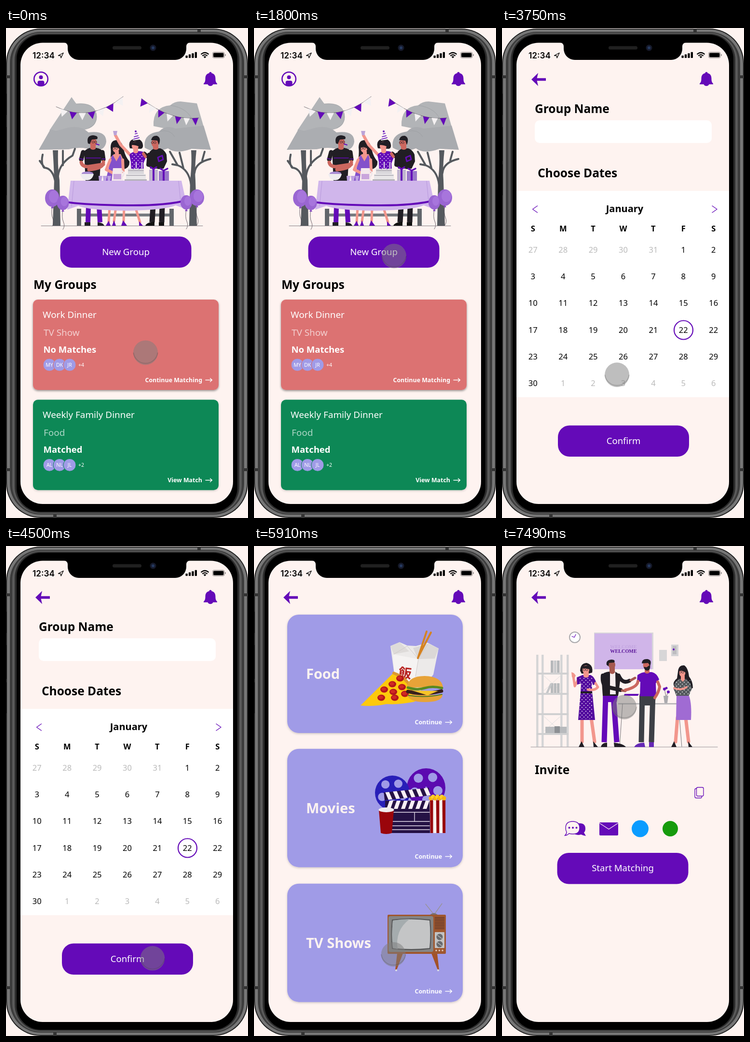
Write an HTML page that moves like this. It is 502 px wide and 1014 px high and loops after 8000 ms.

```html
<!DOCTYPE html>
<html lang="en">
<head>
<meta charset="utf-8">
<title>Group planner prototype</title>
<style>
html, body { margin: 0; width: 100%; height: 100%; overflow: hidden; background: #fdf3f0; }
svg { display: block; width: 100%; height: 100%; }
text { font-family: "Noto Sans", "Open Sans", sans-serif; white-space: pre; }
.clock { font-family: Inter, "Liberation Sans", sans-serif; }
.cjk { font-family: "Noto Sans CJK JP", "Noto Sans CJK SC", "Noto Sans CJK", sans-serif; }
.slab { font-family: "Liberation Serif", "Noto Serif", serif; }
</style>
</head>
<body>
<svg id="stage" viewBox="0 0 502 1014"></svg>
<script>
const LOOP = 8000, PURPLE = '#640ab8', BG = '#fef3f0', LAV = '#a09be7', INK = '#211e24', PINK = '#f2968c', TAN = '#cc675f', BROWN = '#a5584f';

// Drawing helpers, each returns SVG markup
const R = (x, y, w, h, fill, r = 0, more = '') => `<rect x="${x}" y="${y}" width="${w}" height="${h}" rx="${r}" fill="${fill}" ${more}/>`;
const C = (x, y, r, fill, more = '') => `<circle cx="${x}" cy="${y}" r="${r}" fill="${fill}" ${more}/>`;
const E = (x, y, rx, ry, fill, more = '') => `<ellipse cx="${x}" cy="${y}" rx="${rx}" ry="${ry}" fill="${fill}" ${more}/>`;
const P = (d, fill, more = '') => `<path d="${d}" fill="${fill}" ${more}/>`;
const L = (d, color, w = 1, cap = 'round') => `<path d="${d}" fill="none" stroke="${color}" stroke-width="${w}" stroke-linecap="${cap}" stroke-linejoin="round"/>`;
const T = (x, y, s, size, fill = '#000', weight = 400, anchor = 'start', more = '') =>
  `<text x="${x}" y="${y}" font-size="${size}" fill="${fill}" font-weight="${weight}" text-anchor="${anchor}" ${more}>${s}</text>`;
const G = (body, more = '') => `<g ${more}>${body}</g>`;
const each = (list, fn) => list.map(fn).join('');
const range = (n, fn) => each([...Array(n).keys()], fn);

const heading = (x, y, s) => T(x, y, s, 24.5, '#000', 700);
const action = (x, y, s) => T(x, y, s, 12.4, '#fff', 600, 'end') + L(`M${x + 7} ${y - 4.5}h13.5m-4-3.5l4 3.5l-4 3.5`, '#fff', 1.4);
const button = (x, y, s) => R(x, y, 272, 64.5, PURPLE, 24) + T(x + 136, y + 38, s, 18.6, '#fff', 400, 'middle');

const status = () =>
  T(55, 63, '12:34', 17.2, '#000', 600, 'start', 'class="clock"') +
  P('M108.5 57L119 51.5L114 62L113.3 57.4Z', 'none', 'stroke="#000" stroke-width="1.3" stroke-linejoin="round"') +
  range(4, i => R(372.5 + i * 6.4, 57 - i * 2.4, 4.3, 5 + i * 2.4, '#000', 1)) +
  L('M404.5 54.5Q412.5 47.5 420.5 54.5', '#000', 2.3, 'butt') +
  L('M407.3 57.7Q412.5 53.2 417.7 57.7', '#000', 2.2, 'butt') +
  P('M412.5 62.5L409.6 59.6Q412.5 57 415.4 59.6Z', '#000') +
  R(428.5, 50, 24.5, 12, 'none', 3, 'stroke="#8a8583"') + R(430, 51.5, 21.5, 9, '#000', 1.8) + R(454.3, 54, 1.6, 4, '#8a8583', 1);

const bell = P('M424 91c2 0 2.5 1 2.5 2.5c6 1 8 6 8 11c0 6 1 8 3.5 10.5v1.5h-28v-1.5c2.5-2.5 3.5-4.5 3.5-10.5c0-5 2-10 8-11c0-1.5 .5-2.5 2.5-2.5zM418.5 116h11a5.5 4 0 0 1-11 0z', PURPLE);
const back = P('M61 106.5L75 93L72.5 103.7H91V109.3H72.5L75 120Z', PURPLE);
const page = (id, body) => G(R(30, 30, 441, 955, BG) + status() + bell + body, `id="${id}"`);
const dots = (x, y, w, h) => R(x, y, w, h, 'url(#dots)');
const glasses = (x, y) => C(x - 2.5, y, 2.2, 'none', 'stroke="#33262d" stroke-width=".8"') + C(x + 3, y, 2.2, 'none', 'stroke="#33262d" stroke-width=".8"');

// Home: garden party
function bunting(x0, y0, cx, cy, x1, y1, first, step, odd) {
  const at = t => [x0, y0].map((a, k) => (1 - t) ** 2 * a + 2 * t * (1 - t) * [cx, cy][k] + t * t * [x1, y1][k]);
  return L(`M${x0} ${y0}Q${cx} ${cy} ${x1} ${y1}`, '#55505a', .8) + range(7, i => {
    const t = first + i * step, a = at(t - .055), b = at(t + .055);
    const dx = b[0] - a[0], dy = b[1] - a[1], n = 15 / Math.hypot(dx, dy);
    const tip = [(a[0] + b[0]) / 2 - dy * n, (a[1] + b[1]) / 2 + dx * n];
    return P(`M${a}L${b}L${tip}Z`, i % 2 === odd ? PURPLE : '#f4f1f2');
  });
}
const balloon = (x, y, rx, ry) => L(`M${x} ${y + ry}q-3 15 1 24t-1 16`, '#4a4550', .8) + E(x, y, rx, ry, '#9a66d2') + E(x + 3, y - 3, rx - 5, ry - 5, '#a775dc') + P(`M${x - 3} ${y + ry + 3}l3-5l3 5z`, '#8447c0');

function party() {
  const trees =
    P('M136 143L146 157Q187 153 188 184Q188 207 160 211L90 212Z', '#b2b4b7') +
    L('M146 157Q187 153 188 184Q188 200 172 207', '#9b9da1', .8) +
    P('M68 252L92 210Q104 214 119 209Q152 198 171 216Q208 211 208 235Q206 254 182 254Q158 244 130 251Z', '#abadb1') +
    P('M306 203Q304 163 341 160Q349 152 362 152L396 156L410 204L360 214Z', '#b2b4b7') +
    P('M288 248Q283 219 318 214Q330 200 352 208L410 202L425 252L385 250Q352 262 336 249Q308 260 288 248Z', '#a9abaf') +
    L('M341 160Q380 166 388 195M318 214Q340 208 350 225', '#9b9da1', .8) +
    P('M97 409L100 315Q99 280 97 253H108Q107 290 111 315L113 409Z', '#55595e') +
    L('M103 322Q98 290 79 289Q72 280 76 262M80 289L70 275M108 306Q111 280 138 264L143 250M118 284L118 254', '#55595e', 4) +
    P('M380 409L382 315Q386 280 384 253H395Q391 290 393 315L396 409Z', '#55595e') +
    L('M384 325Q380 293 356 284L340 256M356 284L345 282M391 300Q393 278 424 271M407 274L412 256M368 290L360 258', '#55595e', 4);

  const under =
    R(150, 384, 195, 6, '#777b80') + R(147, 374, 9, 35, '#62666b') + R(339, 374, 9, 35, '#62666b') +
    L('M171 368L170 402M193 368L195 402', PURPLE, 10, 'butt') + P('M163 402h12v7h-12zM190 402q12 1 14 7h-14z', INK) +
    L('M215 370L213 402M228 370L224 400M245 370L244 400M268 370L278 402', PINK, 5) +
    P('M207 409l6-10l4 10zM220 409l4-11l4 11zM239 409l4-11l8 11zM276 400l8 9h-8z', PURPLE) +
    L('M305 368L303 402M324 368L323 402', INK, 11, 'butt') + P('M289 409q3-7 19-8v8zM317 402h11v7h-11z', '#111');

  const man =
    P('M162 255Q170 248 176 248H187Q198 250 201 256L196 282L194 316H165Z', INK) + L('M160 257L156 272M200 257L202 272', INK, 9) +
    L('M156 278Q158 287 170 287L202 282M202 277Q203 291 172 293', TAN, 7) + L('M152 270l9 2M166 269H196M199 271h7', PURPLE, 1.5) +
    P('M175 250v-8h11v8q-5 4-11 0z', TAN) + E(181, 237, 7.5, 9, TAN) + P('M170 239Q166 223 180 222Q193 223 189 230L178 231L174 240Z', INK) +
    glasses(183, 236) + L('M187 240l6 2', PURPLE, 2);

  const brunette =
    P('M217 247Q217 232 230 232Q241 234 244 250Q247 266 256 276Q257 290 244 292L214 280Q219 264 217 247Z', INK) +
    P('M216 268L224 261H238L242 270L240 316H210Z', PINK) + P('M217 272L221 262L229 276L237 262L241 274L240 316H207Z', '#8351cb') +
    P('M226 263v-8h8v8l-4 5z', PINK) + E(228, 249, 7, 9, PINK) + P('M220 248Q221 236 231 237Q238 243 237 254Q233 243 220 248Z', INK) + glasses(226, 249) +
    L('M216 273L208 293L222 300M242 273L243 296L233 302', PINK, 6);

  const dancer =
    L('M259 264L238 242L227 222', PINK, 6) + P('M222 213h9l-2 9h-5z', '#bba3d8') +
    P('M256 262Q266 252 284 256L291 266L285 280L286 300H260L259 277Z', PURPLE) + dots(259, 259, 26, 40) +
    P('M257 249Q252 234 264 230Q282 227 284 242Q285 249 279 250Z', INK) + P('M264 257v-8h10v8q-5 5-10 0z', PINK) + E(268, 244, 7, 9, PINK) + P('M260 242Q264 232 276 237L277 246Q270 242 260 242Z', INK) +
    P('M269 214L263 233L277 231Z', '#f4f1f2') + L('M266 225l8-2M265 230l11-3M268 219l4-1', PURPLE, 1.8) + C(269, 214, 2, PURPLE);

  const guest =
    P('M298 256Q304 250 309 249H320Q329 252 333 262L334 276L327 291H299L295 272Z', INK) + L('M297 262L295 283L318 288M294 266L287 260', INK, 8) +
    L('M285 260l4 6', TAN, 6) + L('M315 268l9-4l2 8l-9 4z', PURPLE, 3) +
    P('M305 250v-8h11v8q-5 4-11 0z', TAN) + E(309, 238, 7.5, 9, TAN) + P('M301 232Q303 222 313 223Q323 227 317 242L314 233Z', INK) + glasses(306, 237);

  const table =
    P('M134 316H364L377 376L352 367Q330 377 248 378Q170 377 150 368L127 376Z', '#d0b6eb') +
    L('M141 317L136 369M358 317L363 367', '#b899dc', 1) + L('M131 361Q170 366 250 367T373 357', PURPLE, 4) +
    E(169, 301, 12, 4, '#a88bd3') + P('M154 302h28q-3 13-14 13t-14-13z', '#eeecef') + range(3, i => P(`M${192 + i * 9} 306h8l-2 10h-5z`, '#bda2e2')) +
    P('M222 290h18l3 26h-24z', '#f4e8ec') + L('M240 295q9 6 0 14', '#eee5ea', 2.5) + R(223, 302, 16, 11, '#c9a5dc') +
    R(253, 291, 33, 11, '#dad8dc') + R(249, 302, 41, 11, '#e9e7e9') + R(246, 313, 46, 3, '#b5b3b8') + L('M250 305h39M254 295h31', '#aaa7ae', 1.5) +
    range(5, i => R(257 + i * 6, 277 + i % 2 * 2, 2, 13, i % 2 ? PURPLE : '#eee')) +
    R(297, 293, 18, 23, '#c0b5cf') + R(317, 296, 21, 20, '#9976c9') + R(304, 293, 4, 23, PURPLE) + R(325, 296, 4, 20, PURPLE) +
    L('M306 292l-6-4m6 4l6-4M327 295l-7-4m7 4l8-4', PURPLE, 3.5);

  return trees + bunting(104, 163, 173, 197, 243, 142, .12, .136, 1) + bunting(281, 146, 340, 193, 400, 186, .055, .147, 0) +
    under + man + brunette + dancer + guest + table + balloon(96, 352, 15, 18) + balloon(118, 362, 12.5, 15) + balloon(396, 351, 15, 17) + balloon(374, 361, 12, 15) + L('M73 409.5H408', '#77727a', .9);
}

const groupCard = (y, fill, shadow, title, kind, state, people, extra, link) =>
  R(56, y, 385, 187, fill, 10, `filter="url(#${shadow})"`) + T(76, y + 38, title, 18.9, '#fff') +
  T(78, y + 74.5, kind, 18.9, '#fff', 400, 'start', 'opacity=".66"') + T(77.5, y + 109.5, state, 18.5, '#fff', 700) +
  each(people, (p, i) => C(90 + i * 21, y + 135, 13, LAV, `stroke="${fill}"`) + T(90 + i * 21, y + 138.8, p, 10.5, '#fff', 400, 'middle')) +
  T(150, y + 139, extra, 10.5, '#fff') + action(407, y + 171, link);

const home = page('home',
  C(72.5, 105.5, 14.3, 'none', `stroke="${PURPLE}" stroke-width="2.6"`) + C(72.5, 102, 4, PURPLE) + P('M65.5 118v-5q0-4 4-4h6q4 0 4 4v5q-7 4-14 0z', PURPLE) +
  party() + button(112.5, 431.5, 'New Group') + heading(57, 540, 'My Groups') +
  groupCard(562, '#dc7272', 'lifted', 'Work Dinner', 'TV Show', 'No Matches', ['MY', 'DK', 'JR'], '+4', 'Continue Matching') +
  groupCard(769.3, '#0c8857', 'shadow', 'Weekly Family Dinner', 'Food', 'Matched', ['AL', 'NL', 'JL'], '+2', 'View Match'));

// Calendar
const dayNumber = i => i < 5 ? 27 + i : i < 27 ? i - 4 : i < 36 ? i - 5 : i - 35;
const colX = i => 64.3 + i % 7 * 62.4;
const dates = page('dates',
  back + heading(68, 176, 'Group Name') + R(68, 191, 367, 47, '#fff', 10) + heading(74, 309, 'Choose Dates') +
  R(30, 337, 441, 427, '#fff') + T(254.5, 381, 'January', 20, '#000', 700, 'middle') +
  L('M73.5 368L63.5 375L73.5 382M436 368L446 375L436 382', PURPLE, 1.2) +
  each([...'SMTWTFS'], (d, i) => T(colX(i), 421, d, 16.5, '#000', 700, 'middle')) +
  range(42, i => T(colX(i), 464.5 + Math.floor(i / 7) * 55.35, dayNumber(i), 16.5, i < 5 || i > 35 ? '#bababa' : '#000', 400, 'middle')) +
  C(376.5, 625, 19.5, 'none', `stroke="${PURPLE}" stroke-width="2.2"`) + button(116, 822.5, 'Confirm'));

// Categories
const food =
  P('M283 207L302 199L318 206L336 207L360 200L383 212L372 266L345 300L292 272Z', '#eceae9') + P('M283 207L302 199L322 218L290 224Z', '#dedbd9') + P('M330 211L362 202L383 212L375 233L340 234Z', '#dbd8d7') +
  P('M288 224L341 234L332 290L292 280Z', '#f5f3f2') + L('M341 234L335 270M290 224L318 207L341 234L360 204', '#cfcac9', 1) +
  L('M340 232L358 177M341 229L367 179', '#d58322', 4) + T(313, 273, '飯', 27, '#b8221f', 700, 'middle', 'class="cjk" transform="rotate(7 313 263)"') +
  P('M221 330L289 263Q323 276 334 322Q300 329 275 327Q245 333 221 330Z', '#fdc90c') + L('M290 263Q326 276 332 313', '#dc982f', 6) +
  each([[287, 286], [303, 274], [270, 297], [289, 302], [307, 292], [264, 314], [292, 314], [313, 306]], ([x, y]) => E(x, y, 8, 6.5, '#b5161c') + E(x - 1, y - 1, 5, 3.5, '#d02a22')) +
  P('M317 293Q319 269 354 269Q389 270 392 292Z', '#e7a338') + P('M318 308H391Q390 323 354 323Q322 323 318 308Z', '#e7a338') +
  L('M319 293Q338 299 354 294T390 294', '#59891f', 5) + L('M319 301Q352 309 389 300', '#38201c', 7) + P('M328 299L382 300L360 309Z', '#f7c427') + L('M320 309Q354 315 390 307', '#4e7b25', 2);

const reel = (x, y, r, fill) => C(x, y, r, fill) + range(5, i => {
  const a = i * Math.PI * .4 - 1;
  return C((x + Math.cos(a) * r * .63).toFixed(1), (y + Math.sin(a) * r * .63).toFixed(1), r * .24, LAV);
}) + C(x, y, 2, LAV);
const movies =
  reel(357, 500, 40, '#5b0ab0') + reel(287, 511, 36, '#281fb8') +
  G(R(271, 510, 94, 16, '#251245') + range(6, i => P(`M${274 + i * 16} 510h8l5 16h-8z`, '#f8eff4')), 'transform="rotate(-6 271 526)"') +
  R(272, 527, 93, 67, '#251245') + range(6, i => P(`M${281 + i * 15} 527h8l-6 17h-8z`, '#f8eff4')) +
  L('M283 551H364M283 570H364M283 579H364M283 587H364M333 551V570', '#e9e1f0', 1.3) +
  P('M364 525H397L395 594H366Z', '#f7f1ee') + range(3, i => P(`M${365 + i * 12.8} 526h6.5v68h-5.8z`, '#97070c')) +
  range(7, i => C(367 + i * 4.5, 522 - i % 2 * 3, 4.5, i % 2 ? '#ffd12d' : '#f9b90d')) +
  P('M259 546H290L286 594Q274 598 263 594Z', '#9a050b') + E(274.5, 546, 16, 5, '#f0ecee');

const tv =
  L('M372 761L356 741M375 761L390 740', '#989394', 1.3) + P('M365 763q8-7 16 0z', '#77706e') +
  P('M297 843h12L296 877h-3zM368 843h12l4 34h-3z', '#a25228') + C(295, 878, 2, '#ddd') + C(382, 878, 2, '#ddd') +
  R(277, 763, 121, 81, '#9f572e', 2) + R(279, 766, 93, 74, '#858585', 4) + P('M286 773Q326 768 366 773Q369 805 366 834Q326 839 286 834Q283 805 286 773Z', '#565758') +
  P('M288 775Q326 770 364 775Q367 805 364 832Q326 836 288 832Q285 805 288 775Z', '#c4c5c6') + P('M288 775Q306 772 323 772Q292 795 298 834L288 832Q285 805 288 775Z', '#a5acae') +
  range(8, i => R(375, 768 + i * 3.3, 20, 1.5, '#623a2b')) + R(375, 799, 20, 33, '#c2c2c2', 1) +
  each([809, 824], y => C(385, y, 6.5, '#67696c') + L(`M381 ${y - 3}l8 6`, '#bbb', 1.5)) + range(3, i => C(378 + i * 6.5, 837, 1.8, '#ddc7b8'));

const typeCard = (y, name, art) => R(69, y, 364, 245, LAV, 24, 'filter="url(#shadow)"') + T(108, y + 133, name, 29, '#fdf3f1', 700) + art + action(390, y + 227.3, 'Continue');
const types = page('types', back + typeCard(142, 'Food', food) + typeCard(419.7, 'Movies', movies) + typeCard(698.7, 'TV Shows', tv));

// Invite: office scene
function office() {
  const room =
    each([71, 82, 121, 134], x => R(x, 225, 4.5, 191, '#d5d5d6')) + each([262, 304, 346, 387], y => R(72, y, 66, 4, '#d0d0d1')) +
    L('M84 266L124 302M124 266L84 302M84 350L124 386M124 350L84 386', '#dededf', 1) +
    range(3, i => R(101 + i * 6.5, 237, 5.5, 25, i % 2 ? '#c9cacc' : '#b6b8bb') + R(101 + i * 6.5, 284, 5.5, 20, '#b9bbbd')) + P('M91 304l9-20l4 2l-8 18z', '#c6c7c9') + R(90, 374, 44, 13, '#b8babd') + R(109, 373, 11, 14, '#8d9094') +
    C(151, 189, 11, '#fff', 'stroke="#aaa9ac" stroke-width="2"') + L('M153 183l-3 6l-5-2', PURPLE, 1.2) +
    R(191, 179, 123, 76, '#d9d7da') + R(192, 181, 119, 74, '#d0b5e9') +
    T(252, 212, 'WELCOME', 10.2, '#c3a6e0', 700, 'middle', 'class="slab"') + T(252, 220.5, 'WELCOME', 10.2, '#5a1599', 700, 'middle', 'class="slab"') +
    R(326, 215, 16, 23, '#d7d6d7') + R(351, 204, 15, 24, '#d5d4d6') + R(354, 207, 8, 17, '#bebdc0') + C(356, 214, 2, PURPLE) +
    L('M242 326.5H362', '#b2b1b4', 2.5) + L('M250 327L244 416M366 329L373 416', '#77757a', 1) +
    L('M340 311L337 296M341 311L345 301', '#69646c', 1) + C(337, 296, 3, PURPLE) + C(345, 302, 3, PURPLE) + C(341, 294, 2.5, PURPLE) + P('M335 310h10l-2 15h-6z', '#aaa9ad') +
    P('M254 306h30l-2 4h-29z', PURPLE) + L('M60 416H447', '#b8b4b7', 1.5);

  const greeter =
    L('M166 355L166 405M185 355L192 405', PINK, 7) + P('M159 416l6-12l6 12zM189 404l10 12h-9z', INK) + L('M158 276L151 290L148 270', PINK, 5) + P('M144 261l5 2l4 5l-3 6l-5-3z', PINK) +
    P('M155 272L167 267H184Q192 271 196 284L189 288L186 281L187 301L193 360H158L163 303L164 284L156 287Z', '#530a9e') + dots(159, 272, 29, 86) +
    L('M194 284L199 292Q192 300 178 297', PINK, 5) + R(163, 301, 24, 4, INK) +
    P('M162 258Q163 242 176 242Q190 246 187 262L180 264L165 264Z', INK) + P('M169 270v-9h11v9q-6 5-11 0z', PINK) + E(174, 256, 7, 9, PINK) + P('M165 254Q170 244 183 250V256Q176 252 165 254Z', INK) + glasses(173, 256);

  const suit =
    L('M215 309L212 406M231 309L238 406', PURPLE, 11, 'butt') + P('M209 305H241L238 323H210Z', PURPLE) + P('M205 416q2-9 13-9v9zM232 407q20 2 25 9h-24z', INK) +
    P('M206 267Q212 261 222 260H234Q243 263 246 272L241 310H209Z', INK) + P('M224 261h11l1 46h-12z', '#f6edee') +
    L('M209 268Q207 288 219 292L246 298M242 268Q250 286 264 279', INK, 8) + L('M249 299l7 1M267 278l9-5', BROWN, 5) +
    P('M223 250h11v12q-5 6-11 0z', BROWN) + E(228, 246, 7, 9, BROWN) + P('M217 246Q215 236 227 235Q236 235 233 241L222 242L221 249Z', INK);

  const casual =
    L('M291 306L289 406M313 306L310 406', '#3d4046', 11, 'butt') + P('M285 309H320L316 330H285Z', '#3d4046') + P('M274 416q5-9 21-9l2 9zM305 406h10v10h-10z', '#6528b5') +
    P('M281 267Q290 261 297 261H311Q321 263 326 276L319 284L320 311H286L287 281L280 280Z', PURPLE) +
    L('M282 280Q281 292 256 298M323 281L327 291Q325 303 317 314', TAN, 6) +
    P('M296 262v-9h10v9q-5 4-10 0z', TAN) + E(300, 246, 7.5, 9.5, TAN) + P('M294 250l6 1l7-5q2 11-6 12q-6-1-7-8z', INK) + P('M290 243Q290 233 302 234Q312 236 307 248L303 242Z', INK);

  const manager =
    L('M364 355L360 405M381 355L387 405', PINK, 7) + P('M351 416l6-12l5 12zM386 404l9 12h-8z', INK) +
    P('M365 260Q366 246 378 247Q386 252 388 270Q396 280 396 294L382 297L357 290Q353 282 363 274Z', INK) +
    P('M359 282L367 275H382L390 283L394 295L387 311H362L356 296Z', '#555a5e') + dots(358, 278, 34, 31) + P('M362 310H388Q394 326 392 360H361Z', '#a06bd3') +
    L('M357 294Q370 300 383 292', PINK, 4) + P('M371 277v-9h8v9l-4 4z', PINK) + E(374, 262, 6.5, 9, PINK) + P('M366 259Q369 249 380 252L382 264Q377 256 366 259Z', INK) + glasses(372, 261);
  return room + greeter + suit + casual + manager;
}
const outline = w => `stroke="${PURPLE}" stroke-width="${w}"`;
const invite = page('invite',
  back + office() + heading(68, 472, 'Invite') +
  P('M403.5 502h-1q-2.5 0-2.5 2.5v14q0 3 3 3h9q2.5 0 2.5-2.5v-1', 'none', outline(1.3)) + R(403.5, 499.5, 14.5, 18, BG, 2.5, outline(1.3)) +
  P('M157 574Q173 572 173 585Q173 590 170 593L174 600Q168 599 164 597Q153 600 147 593Z', PURPLE) +
  P('M146.5 570Q161 570 161 583.5Q161 596 147 596Q143 596 139 595Q135 599 130.5 599Q134 596 134 592Q132 588 132 583.5Q132 570 146.5 570Z', BG, outline(1.4)) +
  range(3, i => C(139.5 + i * 7.5, 583, 2, PURPLE)) +
  R(202, 572, 39, 27, PURPLE, 2) + L('M203 574L221.5 586L240 574', BG, 1.3) +
  C(286.5, 585, 17.5, '#0a9cff') + C(349, 585, 16, '#169b0d') + button(114.5, 635, 'Start Matching'));

// Phone body
const shell =
  each([[0, 1, '#1f1f1f'], [2, 3, '#777'], [8, 8, '#3c3c3c'], [13, 10, '#5a5a5a'], [18, 12, '#2c2c2c'], [22, 14, '#000']],
    ([x, y, f]) => R(x, y, 502 - 2 * x, 1015 - 2 * y, f, 72 - x)) +
  each([98, 911], y => R(0, y, 8, 6, '#333') + R(494, y, 8, 6, '#333')) + R(397, 1, 7, 8, '#333') + R(98, 1007, 7, 7, '#333') +
  each([[136, 44], [205, 70], [282, 64]], ([y, h]) => R(0, y, 2, h, '#111'));
const notch = P('M120 29H382V30A8 8 0 0 0 374 38V43A23 23 0 0 1 351 66H151A23 23 0 0 1 128 43V38A8 8 0 0 0 120 30Z', '#000') +
  R(221, 37.5, 60, 7, '#202020', 3.5) + C(305, 41, 6.5, '#161a2b') + C(305, 41, 3, '#25395f');

const softShadow = (id, dy, blur, opacity) => `<filter id="${id}" x="-10%" y="-10%" width="120%" height="125%"><feDropShadow dx="0" dy="${dy}" stdDeviation="${blur}" flood-opacity="${opacity}"/></filter>`;
const stage = document.getElementById('stage');
stage.innerHTML = `<defs>
  <clipPath id="screen"><rect x="30" y="30.5" width="441" height="954.5" rx="46"/></clipPath>
  ${softShadow('shadow', 1.5, 2, .2)}${softShadow('lifted', 2, 2.2, .42)}
  <pattern id="dots" width="8" height="8" patternUnits="userSpaceOnUse"><circle cx="2" cy="2" r=".9" fill="#fff"/><circle cx="6" cy="6" r=".9" fill="#fff"/></pattern>
</defs>` + shell + G(home + dates + types + invite, 'clip-path="url(#screen)"') + notch +
  G(L('M-25 1A25.3 25.3 0 0 0 25 1', 'rgba(0,0,0,.24)', 1.8) + C(0, .3, 25.4, 'rgba(127,127,127,.5)'), 'id="pointer"');

const pages = ['home', 'dates', 'types', 'invite'].map(id => document.getElementById(id));
const pointer = document.getElementById('pointer');
const slides = [[1965, 370], [4699, 300], [7340, 150]];

// Pointer keys: time, x, y
const keys = [
  [0, 289.5, 671.5], [1080, 289.5, 671.5], [1450, 261, 578], [1800, 290.5, 471.5],
  [3030, 290.5, 471.5], [3250, 268, 520], [3500, 226, 630], [3750, 238.5, 717], [3870, 248, 751], [4150, 284, 815], [4560, 304.5, 854],
  [5500, 304.5, 854], [5600, 293, 850], [5870, 293, 850], [6160, 196, 700], [6390, 140, 545], [6540, 163.5, 443.5], [6700, 204, 381], [6870, 253.8, 333], [LOOP, 253.8, 333]
];
const same = (a, b) => a[1] === b[1] && a[2] === b[2];
function slope(i, k) {
  const a = keys[i - 1], b = keys[i], c = keys[i + 1];
  return !a || !c || same(a, b) || same(b, c) ? 0 : (c[k] - a[k]) / (c[0] - a[0]);
}
function pointerAt(time, k) {
  const i = Math.max(0, keys.findIndex(key => key[0] > time) - 1);
  const a = keys[i], b = keys[i + 1], d = b[0] - a[0], u = (time - a[0]) / d, v = 1 - u;
  return a[k] * (1 + 2 * u) * v * v + slope(i, k) * d * u * v * v + b[k] * u * u * (3 - 2 * u) - slope(i + 1, k) * d * u * u * v;
}

function draw(time) {
  const shown = slides.map(([start, span]) => 1 - (1 - Math.min(1, Math.max(0, (time - start) / span))) ** 4);
  pages.forEach((el, i) => {
    const enter = i ? shown[i - 1] : 1, leave = shown[i] || 0;
    el.setAttribute('visibility', enter > 0 && leave < 1 ? 'visible' : 'hidden');
    el.setAttribute('transform', `translate(${(441 * (1 - enter) - 44 * leave).toFixed(2)} 0)`);
  });
  pointer.setAttribute('transform', `translate(${pointerAt(time, 1).toFixed(2)} ${pointerAt(time, 2).toFixed(2)})`);
}

const began = performance.now();
function tick() {
  draw((performance.now() - began) % LOOP);
  requestAnimationFrame(tick);
}
tick();
</script>
</body>
</html>
```
